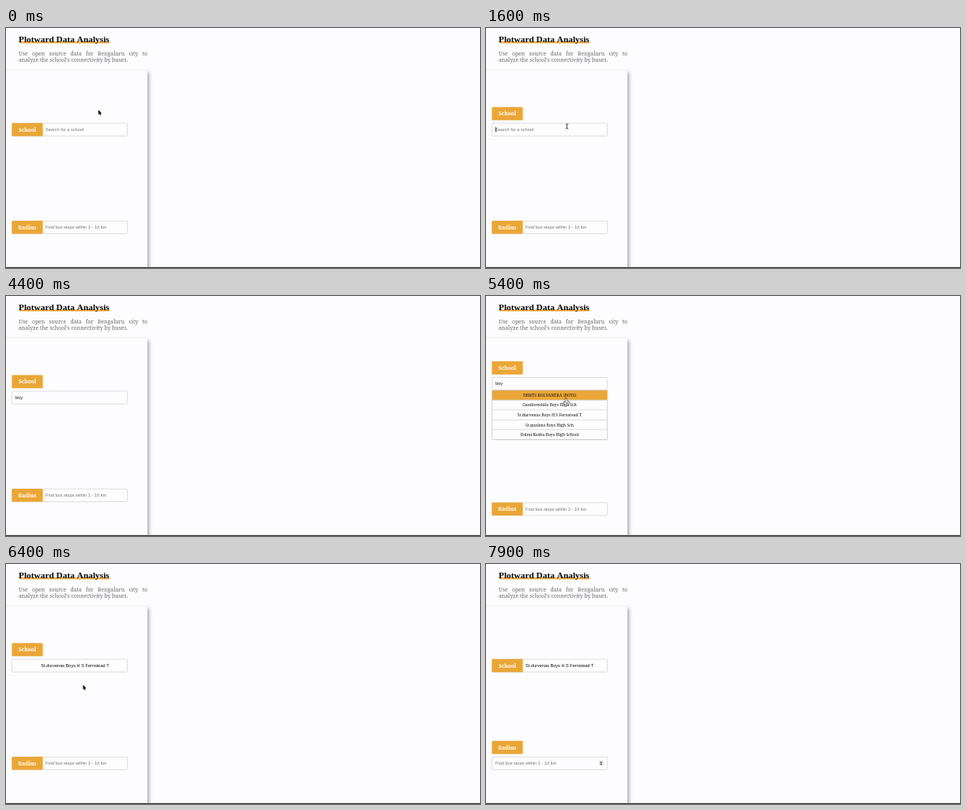
An HTML page with a canvas for the animation above (8000 ms loop, 600 by 305 pixels).

```html
<!DOCTYPE html>
<html lang="en">
<head>
<meta charset="utf-8">
<title>School connectivity search</title>
<style>
  html, body { margin: 0; width: 100%; height: 100%; overflow: hidden; background: #fdfcfe; }
  canvas { display: block; width: 600px; height: 305px; }
</style>
</head>
<body>
<canvas id="stage"></canvas>
<script>
const W = 600, H = 305, LOOP = 8000;
const canvas = document.getElementById('stage');
const ctx = canvas.getContext('2d');
const ratio = window.devicePixelRatio || 1;
canvas.width = W * ratio;
canvas.height = H * ratio;

const PAGE = '#fdfcfe', ORANGE = '#eaa637', BORDER = '#d6d4d9';
const SANS = '5.6px "Liberation Sans", Arial, sans-serif';
const serif = (size, weight = 400) => `${weight} ${size}px "Noto Serif", serif`;

const SCHOOLS = [
  'DHRTS KOLVANERA (BOYS)',
  'Gandoreshila Boys High Sch',
  'St.durvenas Boys H S Fernstead T',
  'St.quolens Boys High Sch',
  'Dolmi Kesha Boys High School'
];
const ROW = 12.55, LIST_SHIFT = 17.5;

// Moments of the interaction, in ms
const FOCUS = 420, LIST_OPEN = 5250, PICK = 6175, HOVER_RADIUS = 6980, FOCUS_RADIUS = 7210;
const TYPED = [3450, 3620, 3800];

const clamp = v => Math.max(0, Math.min(1, v));
const ease = v => v * v * (3 - 2 * v);
const ramp = (t, start, length) => ease(clamp((t - start) / length));
const blink = (t, since) => (t - since) % 1000 < 500;

// time, x, y of the pointer tip
const POINTER = [
  [0, 117, 104], [100, 117, 104], [400, 102.5, 125], [5250, 102.5, 125],
  [5600, 99, 138], [5900, 99, 142.5], [6080, 98.5, 150], [6175, 98, 152],
  [6400, 97.5, 153.5], [6550, 97.5, 153.5], [7000, 102, 252], [8000, 102, 252]
];

function pointerAt(t) {
  const i = POINTER.findIndex(p => p[0] > t);
  const [t0, x0, y0] = POINTER[i - 1], [t1, x1, y1] = POINTER[i];
  const k = ease((t - t0) / (t1 - t0));
  return { x: x0 + (x1 - x0) * k, y: y0 + (y1 - y0) * k };
}

function box(x, y, w, h, fill, stroke) {
  ctx.beginPath();
  ctx.roundRect(x, y, w, h, 1);
  if (fill) { ctx.fillStyle = fill; ctx.fill(); }
  if (stroke) { ctx.strokeStyle = stroke; ctx.lineWidth = 0.8; ctx.stroke(); }
}

function text(str, x, y, font, color, align = 'left') {
  ctx.font = font;
  ctx.fillStyle = color;
  ctx.textAlign = align;
  ctx.fillText(str, x, y);
}

function justified(str, x, y, width, font, color) {
  const words = str.split(' ');
  ctx.font = font;
  const widths = words.map(w => ctx.measureText(w).width);
  const gap = (width - widths.reduce((a, b) => a + b)) / (words.length - 1);
  words.forEach((word, i) => {
    text(word, x, y, font, color);
    x += widths[i] + gap;
  });
}

function page() {
  ctx.fillStyle = PAGE;
  ctx.fillRect(0, 0, W, H);
  box(16.5, 17, 115, 2.4, '#f3b34a');
  text('Plotward Data Analysis', 16, 18.2, 'bold 11.35px "Liberation Serif", "Times New Roman", serif', '#080808');
  const small = serif(6.85);
  justified('Use open source data for Bengaluru city to', 16, 34.6, 163, small, '#6a6a6c');
  text("analyze the school's connectivity by buses.", 16, 43.2, small, '#6a6a6c');

  ctx.save();
  ctx.shadowColor = 'rgba(0,0,0,.42)';
  ctx.shadowBlur = 5 * ratio;
  ctx.shadowOffsetX = 1.5 * ratio;
  ctx.shadowOffsetY = 1.5 * ratio;
  ctx.fillStyle = PAGE;
  ctx.fillRect(-10, 54, 189, 270);
  ctx.restore();
}

function field({ label, y, lift, slide, value, hint, caret }) {
  box(7.6, y, 146, 16.2, PAGE, BORDER);
  const x = 50 - 38 * slide, base = y + 9.9;
  text(value || hint, x, base, SANS, value ? '#111' : '#757577');
  if (caret) {
    const end = value ? ctx.measureText(value).width : 0;
    ctx.fillStyle = '#111';
    ctx.fillRect(x + end, base - 5, 0.8, 6.2);
  }
  const top = y - 20.2 * lift;
  box(7.4, top - 0.2, 39.2, 16.6, ORANGE);
  text(label, 27, top + 10.5, serif(6.6, 600), '#fff', 'center');
}

function list(top, hovered) {
  box(7.6, top, 146, ROW * 5, PAGE);
  SCHOOLS.forEach((name, i) => {
    const y = top + i * ROW;
    if (i === hovered) {
      ctx.fillStyle = ORANGE;
      ctx.fillRect(7.6, y, 146, ROW);
    }
    ctx.fillStyle = BORDER;
    ctx.fillRect(7.6, y + ROW - 0.4, 146, 0.8);
    text(name, 80.5, y + 8.2, serif(5.15, 500), '#111', 'center');
  });
  box(7.6, top, 146, ROW * 5, null, '#c9c7cc');
}

function spinner() {
  box(142.8, 249.8, 6, 6.6, '#e8e7ea');
  ctx.fillStyle = '#333';
  for (const dir of [-1, 1]) {
    ctx.beginPath();
    ctx.moveTo(144.2, 253.1 + dir * 0.6);
    ctx.lineTo(147.4, 253.1 + dir * 0.6);
    ctx.lineTo(145.8, 253.1 + dir * 2.4);
    ctx.fill();
  }
}

function outline(points, fill, stroke, width) {
  ctx.beginPath();
  points.forEach(([x, y]) => ctx.lineTo(x, y));
  ctx.closePath();
  ctx.lineJoin = 'round';
  ctx.lineWidth = width;
  ctx.strokeStyle = stroke;
  ctx.stroke();
  ctx.fillStyle = fill;
  ctx.fill();
}

const cursors = {
  arrow() {
    outline([[0, 0], [0, 6], [1.3, 4.9], [2.3, 7.1], [3.3, 6.6], [2.4, 4.5], [4.2, 4.4]], '#000', '#fff', 0.9);
  },
  beam() {
    ctx.strokeStyle = '#222';
    ctx.lineWidth = 0.8;
    ctx.beginPath();
    ctx.moveTo(-1.6, -3); ctx.quadraticCurveTo(0, -3, 0, -2);
    ctx.quadraticCurveTo(0, -3, 1.6, -3);
    ctx.moveTo(0, -2); ctx.lineTo(0, 2);
    ctx.moveTo(-1.6, 3); ctx.quadraticCurveTo(0, 3, 0, 2);
    ctx.quadraticCurveTo(0, 3, 1.6, 3);
    ctx.stroke();
  },
  hand() {
    outline([[-0.7, 0], [0.6, 0], [0.8, 3], [3.6, 3.6], [4, 5], [3.2, 8.4],
      [-0.8, 8.4], [-2.8, 5.2], [-2.2, 4.4], [-0.7, 5.4]], '#fff', '#111', 1.1);
    ctx.lineWidth = 0.5;
    ctx.beginPath();
    for (const x of [0.3, 1.4, 2.5]) { ctx.moveTo(x, 5); ctx.lineTo(x, 7.2); }
    ctx.stroke();
  }
};

function pointer(t, { x, y }, listOpen) {
  if ((t > TYPED[0] && t < LIST_OPEN) || t > 7600) return;
  const overField = t < LIST_OPEN ? y > 121 : y > 245;
  const shape = overField ? 'beam' : listOpen && y > 120 ? 'hand' : 'arrow';
  ctx.save();
  ctx.translate(x, y);
  cursors[shape]();
  ctx.restore();
}

function draw(t) {
  ctx.setTransform(ratio, 0, 0, ratio, 0, 0);
  page();

  const listOpen = t >= LIST_OPEN && t < PICK;
  const shift = listOpen ? LIST_SHIFT : 0;
  const spot = pointerAt(t);
  const letters = TYPED.filter(at => t >= at).length;
  const blinkStart = letters ? TYPED[letters - 1] : FOCUS;
  const schoolY = 121 - shift;

  field({
    label: 'School',
    y: schoolY,
    lift: ramp(t, FOCUS, 170) - ramp(t, PICK + 330, 180),
    slide: ramp(t, FOCUS + 300, 290) - ramp(t, PICK, 300),
    value: t >= PICK ? SCHOOLS[2] : 'boy'.slice(0, letters),
    hint: 'Search for a school',
    caret: t >= FOCUS && t < PICK && blink(t, blinkStart)
  });
  field({
    label: 'Radius',
    y: 245.2 + shift,
    lift: ramp(t, FOCUS_RADIUS, 180),
    slide: ramp(t, FOCUS_RADIUS + 300, 290),
    hint: 'Find bus stops within 1 - 10 km',
    caret: t >= FOCUS_RADIUS && blink(t, FOCUS_RADIUS)
  });
  if (t >= HOVER_RADIUS) spinner();
  if (listOpen) {
    const top = schoolY + 16.2;
    list(top, Math.floor((spot.y - top) / ROW));
  }
  pointer(t, spot, listOpen);

  ctx.fillStyle = '#bbb';
  ctx.fillRect(0, 303.5, W, 0.5);
  ctx.fillStyle = '#3a3a3c';
  ctx.fillRect(0, 304, W, 1);
}

function frame() {
  draw(performance.now() % LOOP);
  requestAnimationFrame(frame);
}
frame();
</script>
</body>
</html>
```
